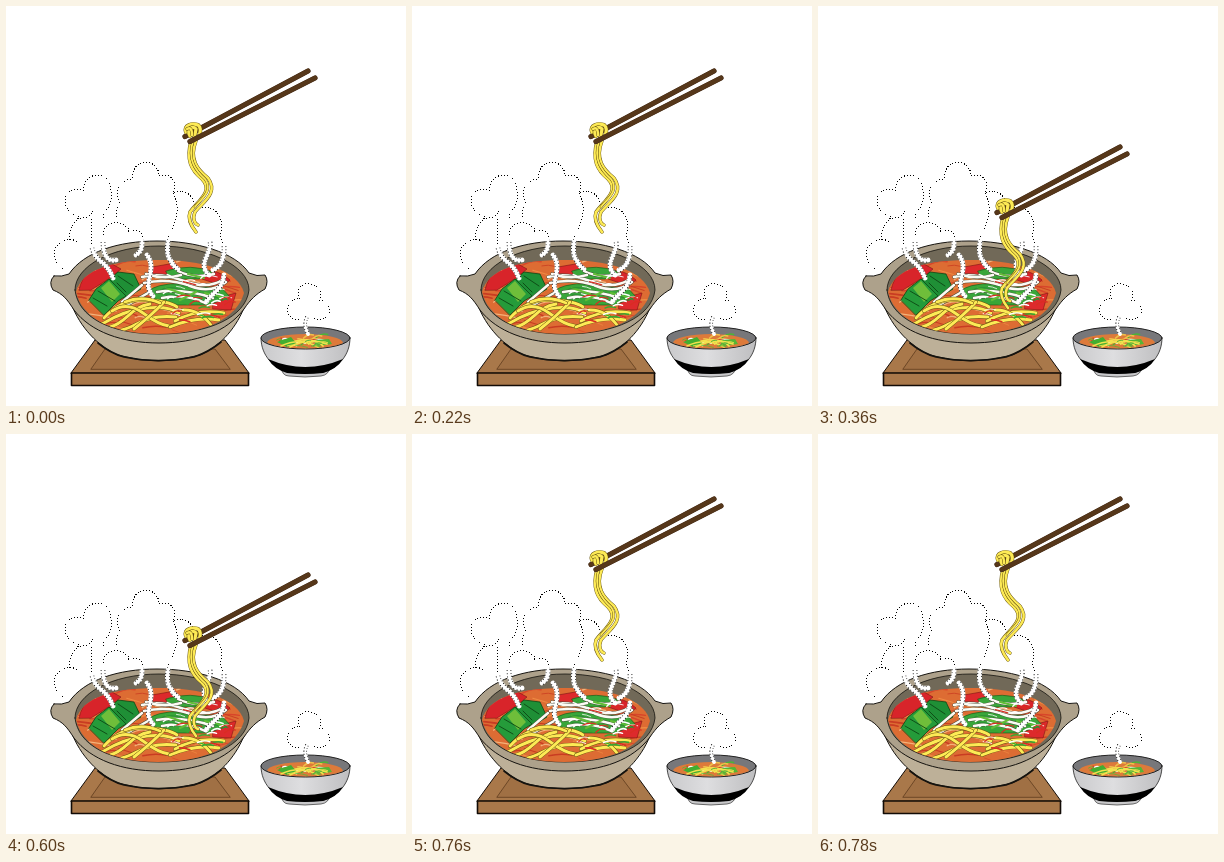
Animation, 400 px wide and 400 px high, one loop 800 ms. Source, as an HTML page:

```html
<!DOCTYPE html>
<html lang="en">
<head>
<meta charset="utf-8">
<title>Noodle hot pot</title>
<style>
  html, body { margin: 0; width: 100%; height: 100%; overflow: hidden; background: #fff; }
  svg { display: block; width: 100vw; height: 100vh; }
</style>
</head>
<body>
<svg id="stage" viewBox="0 0 400 400" fill="none" stroke-linecap="round" stroke-linejoin="round">
  <defs>
    <clipPath id="soupClip"><path d="M70 286C76 263 108 254 152 254S232 264 238 287C231 312 200 328 152 328S76 311 70 286Z"/></clipPath>
    <clipPath id="bowlClip"><ellipse cx="299.5" cy="332" rx="43" ry="10.5"/></clipPath>
    <linearGradient id="china">
      <stop offset="0" stop-color="#c9c9cb"/><stop offset=".45" stop-color="#dedee0"/><stop offset="1" stop-color="#bebec0"/>
    </linearGradient>
  </defs>

  <g id="clouds" stroke="#000" stroke-dasharray="1 2" stroke-linecap="butt" shape-rendering="crispEdges"></g>

  <g id="stand" stroke="#120b06">
    <path d="M65 367L89 334H219L243 367Z" fill="#a9784a"/>
    <path d="M85 363L99 343H209L224 363Z" fill="#a07044" stroke="#5f3b1e" stroke-width=".8"/>
    <path d="M65.500 367H242.500V379.500H65.500Z" fill="#a9784a" stroke-width="1.6"/>
  </g>

  <g id="pot" stroke="#15130f">
    <path d="M67 302C77 326 97 343 112 349Q152 361 194 349C212 341 228 326 238 302Z" fill="#bdb098"/>
    <path d="M92 337Q104 347 118 351Q152 358 188 351Q203 346 215 336" stroke-width="1.7"/>
    <path d="M48 270Q56 271 63 268C78 246 112 235 151 235S229 246 243 267Q251 271 259 269Q263 275 259 283C250 288 244 294 238 303C221 326 190 337 153 337S85 326 68 304C61 293 57 288 47 284Q42 276 48 270Z" fill="#ada18b"/>
    <path d="M69 284C69 260 106 240 153 240S243 259 243 284C240 311 203 328 153 328S72 311 69 284Z" fill="#716958" stroke-width=".8"/>
  </g>

  <g id="soup" clip-path="url(#soupClip)"></g>

  <g id="bowl">
    <path d="M275 361Q276 370 283 370Q299 372 315 370Q323 369 324 361Z" fill="#c8c8ca" stroke="#333" stroke-width=".7"/>
    <path d="M255 332C255 350 268 362 282 366Q300 368 318 366C333 361 344 349 344 332Z" fill="url(#china)" stroke="#222" stroke-width=".8"/>
    <path d="M262 353Q299 369 337 353Q331 363 317 367Q299 369 281 367Q268 363 262 353Z" fill="#000"/>
    <ellipse cx="299.500" cy="332" rx="44.500" ry="11" fill="#77777a" stroke="#222"/>
    <g id="smallSoup" clip-path="url(#bowlClip)"></g>
  </g>

  <g id="wisps"></g>
  <g id="lift"></g>
</svg>
<script>
const LOOP = 800, DIP = [360, 760], DROP = 76;
const el = id => document.getElementById(id);
const shape = (d, fill, stroke = "none", width = 1) =>
  `<path d="${d}" fill="${fill}" stroke="${stroke}" stroke-width="${width}"/>`;
const line = (d, color, width) => shape(d, "none", color, width);
const strand = (d, width = 3, color = "#fdea55") =>
  line(d, "#65520f", width + .9) + line(d, color, width);

// White above and below a dashed stroke leaves dots along both edges.
const wisp = (d, width = 3) =>
  line(d, "#fff", width + 1.8) +
  `<path d="${d}" stroke="#000" stroke-width="${width + 1.6}" stroke-dasharray="1 2" stroke-linecap="butt"/>` +
  line(d, "#fff", width);

let seed = 11;
const random = () => (seed = (seed * 16807) % 2147483647) / 2147483647;

function streaks(count, cx, cy, rx, ry, length, colors) {
  let out = "";
  for (let i = 0; i < count; i++) {
    const x = cx + (random() * 2 - 1) * rx, y = cy + (random() * 2 - 1) * ry;
    const dx = length * (.5 + random()), dy = (random() - .5) * length * .7;
    out += line(`M${x} ${y}q${dx / 2} ${dy - 2} ${dx} ${dy}`, colors[i % colors.length], .7 + random());
  }
  return out;
}

el("clouds").innerHTML = [
  "M57 263C46 257 45 240 56 236Q65 231 71 236M63 234Q63 220 74 211C58 209 53 187 68 184Q73 182 77 185C78 164 104 164 105 184Q107 198 98 207L97 213M71 212Q84 213 87 205M86 213Q84 226 86 240",
  "M110 211Q110 202 114 198C108 184 114 174 126 173C126 150 153 152 153 170C165 166 172 176 167 187C180 180 192 194 187 204M167 187C180 211 158 229 162 240",
  "M98 229C96 217 110 212 122 222Q122 224 123 226C135 219 140 233 136 244",
  "M187 204C207 194 221 211 214 230Q221 242 214 256",
  "M293 313C283 316 277 302 286 295Q289 292 294 293C288 281 299 275 307 279C316 282 316 290 313 294C325 295 327 309 317 313Q310 315 306 311"
].map(d => `<path d="${d}"/>`).join("");

el("soup").innerHTML =
  shape("M65 250H240V330H65Z", "#dd6c33") +
  streaks(90, 148, 291, 84, 36, 15, ["#ee8a42", "#c93c22", "#f3b27a", "#d8452a"]) +
  shape("M73 284Q78 260 104 257L115 263L104 272L85 284Z", "#d8242a", "#7d1713", .6) +
  shape("M146 261L169 257L178 266L161 273L145 269Z", "#dd2a2c", "#7d1713", .6) +
  shape("M194 264Q213 263 224 274L217 280L196 273Z", "#d8242a", "#7d1713", .6) +
  shape("M207 293L230 287L225 304L207 303Z", "#dd2a2c", "#7d1713", .6) +
  shape("M160 265Q185 257 207 266L193 273L164 273Z", "#39a63a", "#155313", .6) +
  shape("M142 284Q165 273 187 281L215 281L224 291L202 299L168 299L147 293Z", "#39a63a", "#155313", .6) +
  shape("M103 274L112 266L128 268L135 283L119 293Z", "#1f8f36", "#0d4714", .8) +
  shape("M83 294L90 283L103 273L120 290L112 295L98 309Z", "#259b3a", "#0d4714", .8) +
  shape("M95 282L103 275L114 288L106 296Z", "#6fbe3a") +
  line("M87 292L101 300M92 285L109 295M112 270L127 280M111 277L120 286", "#0d4714", .9) +
  ["M136 271Q154 266 178 275T218 273", "M138 277Q163 272 184 280T220 276", "M116 296L136 279", "M121 299L142 287",
   "M151 286Q176 282 207 292", "M156 292Q179 287 199 297", "M172 265Q187 273 208 268", "M140 268Q158 274 175 269"]
    .map(d => line(d, "#454a35", 3.3) + line(d, "#fbfbf4", 2.5)).join("") +
  ["M160 282L178 288", "M174 294L190 286", "M199 287L218 292", "M182 268L198 272"]
    .map(d => line(d, "#61bd36", 2.2)).join("") +
  streaks(24, 180, 282, 38, 14, 10, ["#fff", "#2c9434", "#fff", "#d92d22"]) +
  ["M98 312Q115 293 139 294T171 301", "M96 318Q119 304 141 302T173 307", "M104 321C121 317 124 301 144 298",
   "M116 324C132 320 139 308 170 311", "M106 305Q121 295 137 307T163 320", "M128 323Q147 308 158 296",
   "M119 296Q136 289 154 297", "M169 315Q192 302 218 307", "M164 321Q189 310 213 314", "M177 304Q193 303 205 319"]
    .map(d => strand(d, 2.9)).join("") +
  streaks(18, 193, 303, 30, 11, 9, ["#39a72f", "#fff", "#d92d22"]);

el("smallSoup").innerHTML =
  '<ellipse cx="299" cy="337" rx="38" ry="9" fill="#dd7a3a"/>' +
  streaks(22, 292, 336, 24, 5, 10, ["#f0c04a", "#d93a24", "#4bb534", "#fff"]) +
  shape("M271 336L285 331L291 338L281 341Z", "#42ae31") +
  shape("M307 334L323 333L326 338L311 340Z", "#55b535") +
  ["M275 340Q294 331 312 341", "M284 341Q302 331 321 338", "M290 335Q309 331 317 340"]
    .map(d => line(d, "#f3e24d", 1.7)).join("") +
  streaks(8, 294, 338, 20, 4, 8, ["#58b53a", "#f3e24d"]);

el("wisps").innerHTML = [
  "M86 242Q88 251 98 258Q104 264 107 272", "M97 236C97 247 100 256 110 254", "M136 235Q137 245 130 249",
  "M141 249C151 262 139 275 143 283Q144 287 147 290", "M162 236Q160 250 165 255Q167 260 172 263",
  "M204 236C207 247 190 257 203 269", "M218 240Q219 259 207 264", "M218 269C217 283 207 286 200 296"
].map(d => wisp(d)).join("") +
  wisp("M301 311Q297 318 302 328", 2);

const stick = d => line(d, "#3a2210", 5.2) + line(d, "#56371a", 4.6);
el("lift").innerHTML =
  stick("M179 130.500L302 65") +
  strand("M185 135C180 154 185 164 196 173C208 185 192 195 184 206C181 214 186 221 190 226", 2.6) +
  strand("M190 135C183 153 191 163 202 172C213 187 197 196 189 206C186 213 189 218 192 219", 2.4) +
  strand("M187 135C181 154 190 165 199 173C208 185 194 194 189 201", 1.8) +
  strand("M180 126C178 119 186 117 192 119Q196 122 193 130", 3.2) +
  strand("M184 130C180 123 187 119 190 123L188 134", 3.2) +
  strand("M181 123Q186 120 186 129", 2.4) +
  stick("M184 135.500L309 72");

function render(now) {
  const t = now % LOOP;
  const dy = t >= DIP[0] && t < DIP[1] ? DROP : 0;
  el("lift").setAttribute("transform", `translate(0 ${dy})`);
}

const start = performance.now();
function tick() {
  render(performance.now() - start);
  requestAnimationFrame(tick);
}
tick();
</script>
</body>
</html>
```
